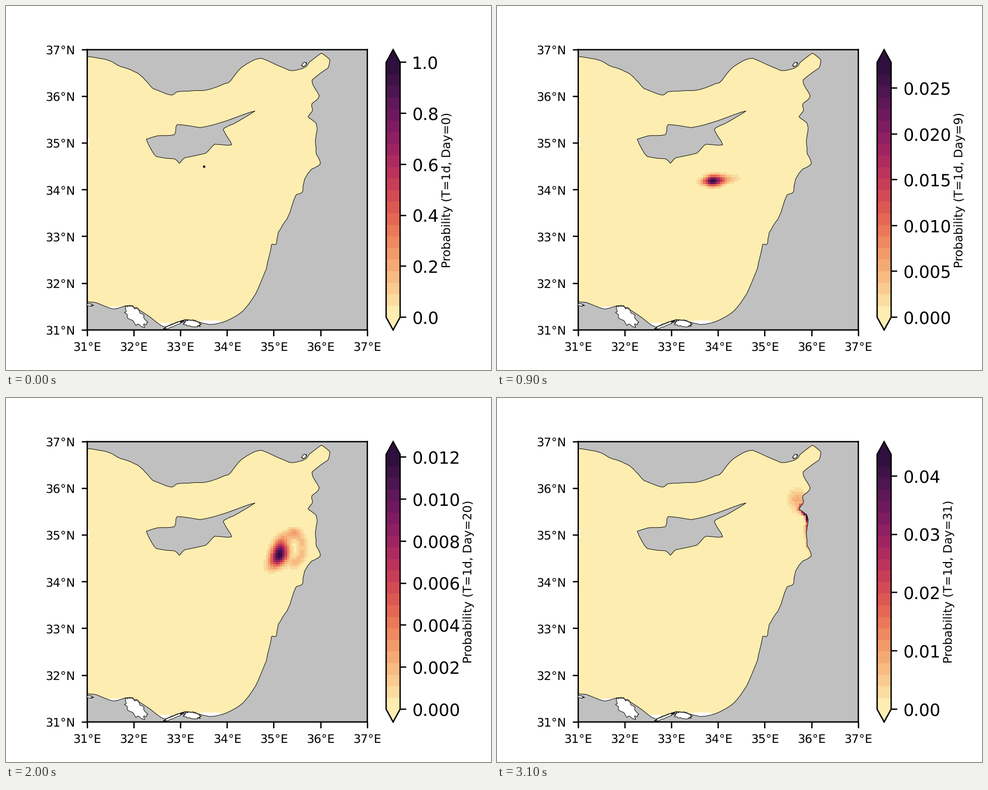
Write a matplotlib script that moves like this. It is 864 px wide and 648 px high and loops after 3.2 s.

```python
import numpy as np
import matplotlib.pyplot as plt
from matplotlib.animation import FuncAnimation
from matplotlib.colors import LinearSegmentedColormap
from matplotlib.patches import Polygon, Rectangle

W, H, DPI = 864, 648, 216
DAYS, STEP_MS = 32, 100
LEFT, RIGHT, TOP, BOTTOM = 144.72, 643.68, 77.76, 576.72
DEG = (RIGHT - LEFT) / 6
CELL = DEG / 20
LAND = "#c0c0c0"
COAST = dict(ec="black", lw=0.3, joinstyle="round")

plt.rcParams.update({"path.snap": False, "text.hinting": "none"})
rng = np.random.default_rng(4)

MATTER = ["#fdedb0", "#facd91", "#f6ad77", "#f08e62", "#e76d54", "#d85053",
          "#c3385a", "#a82860", "#8a1d63", "#6b185d", "#4c1550", "#2f0f3d"]
cmap = LinearSegmentedColormap.from_list("matter", MATTER, N=22)

# Capes and bays in stage pixels; refine() draws the coast between them
NORTH = [(143, 90), (175, 94.5), (198, 105), (229, 117), (248, 132), (262, 147),
         (294, 158.5), (304, 153), (330, 151), (364, 148), (390, 138), (401, 132),
         (420, 109), (455, 93), (506, 115), (531, 110), (543, 98), (562, 84),
         (577, 96), (573, 111)]
EAST = [(573, 111), (545, 132), (558, 160), (545, 174), (546, 186), (538, 197),
        (551, 207), (554, 220), (551, 240), (553, 264), (560, 281), (545, 290),
        (532, 308), (528, 331), (517, 336), (506, 367), (494, 388), (485, 403),
        (481, 424), (473, 425), (464, 467)]
SOUTH = [(464, 467), (445, 512), (422, 543), (393, 560.5), (362, 567), (320, 558),
         (283, 571.5), (257, 554), (221, 533), (192, 539.5), (160, 528), (143, 527)]
ISLAND = [(250, 237), (270, 231), (300, 229), (305, 211), (346, 216.5), (394, 204),
          (443.5, 187), (405, 210), (387, 220), (402, 247), (372, 246), (356, 262),
          (319, 270), (309, 280), (300, 272), (268, 268), (255, 249), (250, 237)]

# Drift of the plume centre and the daily maximum
PATH = np.array([(0, 352.6, 285.7), (4, 351, 317), (6, 365, 312), (9, 386, 311),
                 (16, 474, 301), (20, 488, 278), (23, 491, 250), (27, 543, 222),
                 (31, 535, 178)])
PEAK_DAYS = [1, 6, 9, 16, 20, 27, 30, 31]
PEAKS = [0.26, 0.04336, 0.0278, 0.01839, 0.01213, 0.01681, 0.044, 0.0437]

gx, gy = np.meshgrid(LEFT + CELL * np.arange(121), TOP + CELL * np.arange(121))


def refine(points, jitter, rounds=2, bend=0.045):
    """Insert curved, slightly displaced midpoints."""
    p = np.array(points, float)
    for _ in range(rounds):
        q = np.vstack([p[:1], p, p[-1:]])
        mid = (0.5 + bend) * (q[1:-2] + q[2:-1]) - bend * (q[:-3] + q[3:])
        out = np.empty((2 * len(p) - 1, 2))
        out[::2] = p
        out[1::2] = mid + rng.uniform(-jitter, jitter, mid.shape)
        p, jitter = out, jitter / 2
    return p


def lagoon(x, y, a, b, tilt):
    """A ragged ellipse."""
    t = np.linspace(0, 2 * np.pi, 40)
    r = rng.uniform(0.75, 1.15, t.size)
    u, v, c = a * r * np.cos(t), b * r * np.sin(t), np.radians(tilt)
    return np.column_stack([x + u * np.cos(c) - v * np.sin(c),
                            y + u * np.sin(c) + v * np.cos(c)])


coast = np.vstack([refine(NORTH, 1), refine(EAST, 1), refine(SOUTH, 0.2)])
on_shore = (coast[:, 0] > 535) & (coast[:, 1] > 178) & (coast[:, 1] < 284)
shore = coast[on_shore]
stranded = 0.18 + np.exp(-((shore[:, 1] - 212) / 22) ** 2)
stranded *= rng.uniform(0.3, 1, len(shore))
stranded /= stranded.max()


def blob(x, y, size):
    return np.exp(-((gx - x) ** 2 + (gy - y) ** 2) / (2 * size ** 2))


def centre(day):
    return [np.interp(day, PATH[:, 0], PATH[:, i]) for i in (1, 2)]


def density(day):
    # Water strung out ahead of and behind the centre, thinning with the lag
    stretch = min(1.9, 0.15 * day)
    size = max(1, 2.2 * np.sqrt(day))
    field = sum(np.exp(-abs(u)) * blob(*centre(day + stretch * u),
                                       size * (1 - 0.12 * abs(u)))
                for u in np.linspace(-3, 3, 37))
    field /= field.max()

    # A short-lived eddy curls off to the east
    swirl = 0.07 * np.exp(-((day - 20) / 2.5) ** 2)
    field += swirl * sum(blob(510 + 19 * np.cos(a), 267 + 28 * np.sin(a), 6.5)
                         for a in np.linspace(-1.8, 1.6, 12))

    # Later the plume fades while the shore collects it
    left = np.exp(-0.22 * max(0, day - 22))
    field *= left
    for (x, y), w in zip(shore, stranded):
        field = np.maximum(field, (1 - left) * w * blob(x, y, 2.6))
    return field / field.max()


def peak(day):
    if day == 0:
        return 1
    return np.exp(np.interp(np.log(day), np.log(PEAK_DAYS), np.log(PEAKS)))


fig = plt.figure(figsize=(W / DPI, H / DPI), dpi=DPI, facecolor="white")
ax = fig.add_axes([LEFT / W, 0.11, (RIGHT - LEFT) / W, 0.77], facecolor=LAND)
cax = fig.add_axes([677.16 / W, 0.11, 24.95 / W, 0.77])

sea = Polygon(coast, fc="none", zorder=4, **COAST)
ax.add_patch(sea)

h = CELL / 2
img = ax.imshow(np.zeros_like(gx), cmap=cmap, vmin=0, vmax=1, aspect="auto",
                interpolation="nearest", zorder=1,
                extent=(LEFT - h, RIGHT + h, BOTTOM + h, TOP - h))
img.set_clip_path(sea)

# Coastal water without data
for x, y, w, d in [(143, 234, 5, 15), (182, 535, 24, 6), (268, 564, 24, 9),
                   (345, 560, 38, 8)]:
    gap = Rectangle((x, y), w, d, fc="white", zorder=2)
    ax.add_patch(gap)
    gap.set_clip_path(sea)

ax.add_patch(Polygon(refine(ISLAND, 0.6), fc=LAND, zorder=3, **COAST))
for shape in [(231, 552, 24, 12, 42), (332, 565, 16, 6, 5), (298, 568, 20, 2.5, -22),
              (148, 532, 7, 2, 10), (531, 104, 5, 3, -40)]:
    ax.add_patch(Polygon(lagoon(*shape), fc="white", zorder=3, **COAST))

ax.set_xlim(LEFT, RIGHT)
ax.set_ylim(BOTTOM, TOP)
ax.set_xticks([LEFT + DEG * i for i in range(7)], [f"{31 + i}°E" for i in range(7)])
ax.set_yticks([BOTTOM - DEG * i for i in range(7)], [f"{31 + i}°N" for i in range(7)])
ax.tick_params(labelsize=7)

bar = fig.colorbar(img, cax=cax, extend="both")


def draw(day):
    top = peak(day)
    img.set_data(density(day) * top)
    img.set_clim(0, top)
    bar.set_label(f"Probability (T=1d, Day={day})", size=7, labelpad=2)
    return [img]


anim = FuncAnimation(fig, draw, frames=DAYS, interval=STEP_MS,
                     init_func=lambda: draw(0), repeat=True, repeat_delay=0)
plt.show()
```
